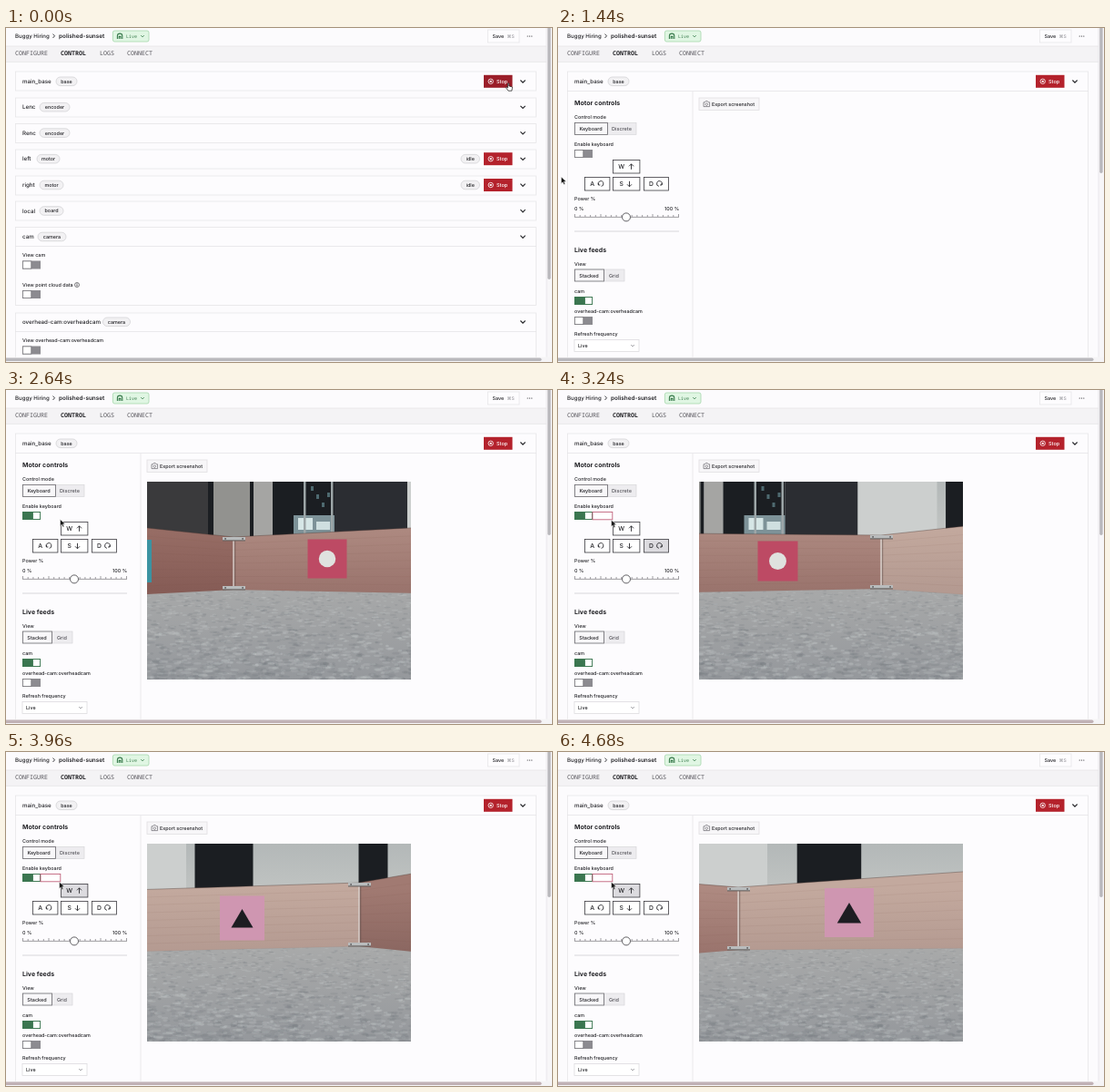
Write an HTML page with a canvas that moves like this. It is 600 by 368 pixels and loops after 4800 ms.

```html
<!DOCTYPE html>
<html lang="en">
<head>
<meta charset="utf-8">
<title>Robot control panel</title>
<style>
  html, body { margin: 0; width: 100%; height: 100%; overflow: hidden; background: #fcfbfd; }
  svg { position: absolute; left: 0; top: 0; font-family: Inter, "Liberation Sans", sans-serif; font-weight: 450; text-rendering: geometricPrecision; fill: #222226; }
  canvas { position: absolute; left: 155px; top: 101px; }
  .mono { font-family: "Noto Sans Mono", monospace; }
  .line { fill: none; stroke: #2a2a2e; stroke-width: .9; }
  .soft { stroke: #e6e5e8; stroke-width: .8; fill: none; }
</style>
</head>
<body>
<svg id="ui" width="600" height="368" viewBox="0 0 600 368"></svg>
<canvas id="feed" width="290" height="218"></canvas>
<script>
const LOOP = 4800, STEP = 120;
const EXPAND = 480, CAM_ON = 960, FEED_ON = 1680, KEYS_ON = 2280, FOCUS = 2880;
const $ = id => document.getElementById(id);

// ---------- interface pieces ----------
const text = (x, y, s, size = 5.5, attr = '') =>
  `<text x="${x}" y="${y + size * .36}" font-size="${size}" ${attr}>${s}</text>`;
const mid = 'text-anchor="middle"';
const rect = (x, y, w, h, fill, attr = '') =>
  `<rect x="${x}" y="${y}" width="${w}" height="${h}" fill="${fill}" ${attr}/>`;
const path = (d, attr = 'class="line"') => `<path d="${d}" ${attr}/>`;
const chevron = (x, y, r = 2.6, attr = 'class="line" style="stroke-width:1.2"') =>
  path(`M${x - r} ${y - r / 2}l${r} ${r}l${r} ${-r}`, attr);
const group = (id, body) => `<g id="${id}">${body}</g>`;
const soft = d => path(d, 'class="soft"');

const pill = (x, y, w, s) =>
  rect(x, y - 4.8, w, 9.6, '#f2f1f3', 'rx="4.8" stroke="#cfced2" stroke-width=".7"') +
  text(x + w / 2, y, s, 5.4, mid);

const stop = (y, id = '') =>
  rect(525, y - 7, 31.5, 14, '#b4222c', `id="${id}"`) +
  `<circle cx="532.7" cy="${y}" r="2.7" fill="none" stroke="#fff" stroke-width=".8"/>` +
  rect(531.7, y - 1, 2, 2, '#fff') +
  text(539, y, 'Stop', 5.6, 'fill="#fff" font-weight="500"');

const rowHead = (y, name, x, w, kind) =>
  text(18, y, name, 6.2) + pill(x, y, w, kind) + chevron(568, y);

const card = (y, h) => rect(10.5, y, 572, h, '#fdfcfe', 'class="soft" style="fill:#fdfcfe"');

const off = (x, y) =>
  rect(x, y, 20, 9, '#8c8b90') + rect(x + .4, y + .4, 9.4, 8.2, '#fff', 'stroke="#77767b" stroke-width=".8"');
const on = (x, y) =>
  rect(x, y, 20, 9, '#3b7650') + rect(x + 11.4, y + .5, 8.2, 8, '#fff', 'stroke="#3b7650" stroke-width=".9"');

const tabs = (x, y, w1, a, w2, b) =>
  rect(x + w1, y, w2, 13, '#edecef', 'stroke="#d8d7da" stroke-width=".7"') +
  rect(x + .4, y, w1, 13, '#f8f7f9', 'stroke="#67666b" stroke-width=".8"') +
  text(x + w1 / 2, y + 6.7, a, 5.5, mid + ' font-weight="500"') +
  text(x + w1 + w2 / 2, y + 6.7, b, 5.5, mid + ' fill="#55545a"');

const turn = (x, y, dir) =>
  path(`M${x - .6 * dir} ${y + 2.8}A2.9 2.9 0 1 ${dir > 0 ? 1 : 0} ${x + 2.6 * dir} ${y + 1.2}m${-2 * dir} .2h${2 * dir}v-2`);
const arrow = (x, y, dir) =>
  path(`M${x} ${y + 3 * dir}v${-6 * dir}m-2.5 ${2.5 * dir}l2.5 ${-2.5 * dir}l2.5 ${2.5 * dir}`);
const keyCap = (x, y, w, k, icon) =>
  rect(x + .4, y + .4, w, 14.6, '#fff', `id="key${k}" stroke="#3b3a3f" stroke-width=".8"`) +
  text(x + w / 2 - 5, y + 7.7, k, 6.8, mid + ' font-weight="500"') + icon;

const header =
  text(10, 8.8, 'Buggy Hiring', 6.1) +
  path('M51.5 6.6l2 2.2l-2 2.2') +
  text(58, 8.8, 'polished-sunset', 6.4, 'font-weight="600"') +
  rect(117.4, 3, 39.6, 12, '#e0f6e3', 'rx="2" stroke="#a5d7ab" stroke-width=".8"') +
  path('M122.4 12v-3.2a2.7 2.7 0 0 1 5.4 0v3.2M124.2 12v-2.6h1.8v2.6', 'fill="none" stroke="#3a7c4e" stroke-width="1.1"') +
  text(132, 9, 'Live', 5, 'class="mono" fill="#3a7c4e"') +
  chevron(150, 9, 1.7, 'fill="none" stroke="#3a7c4e" stroke-width=".9"') +
  rect(529.5, 2, 34.5, 14, '#fdfcfe', 'class="soft" style="fill:#fdfcfe"') +
  text(534.5, 9, 'Save', 5.4, 'font-weight="500"') +
  text(550.5, 9, '⌘S', 5, 'fill="#9a999e"') +
  [573.2, 575.5, 577.8].map(x => `<circle cx="${x}" cy="9" r=".6"/>`).join('') +
  rect(0, 20, 594, 17, '#f4f3f5') + soft('M0 20H594M0 37.4H594') +
  [[10, 'CONFIGURE'], [60, 'CONTROL'], [103, 'LOGS'], [133, 'CONNECT']].map(([x, s]) =>
    text(x, 28, s, 6.67, `class="mono" ${x === 60 ? 'font-weight="700"' : 'fill="#55545a"'}`)).join('');

const list =
  [48, 77, 105.5, 134, 163, 191].map(y => card(y, 21)).join('') +
  card(219.5, 86) + card(314, 70) + soft('M10 240.5H583M10 334.5H583') +
  rowHead(58.8, 'main_base', 55, 23, 'base') +
  rowHead(87.2, 'Lenc', 37, 33, 'encoder') +
  rowHead(115.6, 'Renc', 37, 33, 'encoder') +
  rowHead(144.2, 'left', 34, 25, 'motor') +
  rowHead(173, 'right', 37, 26, 'motor') +
  rowHead(201.5, 'local', 37, 26, 'board') +
  rowHead(230, 'cam', 35, 31, 'camera') +
  rowHead(323.8, 'overhead-cam:overheadcam', 106.5, 30, 'camera') +
  [144.2, 173].map(y => pill(500, y, 20.5, 'idle') + stop(y)).join('') +
  text(18, 250.5, 'View cam', 5.4) + off(18, 256.5) +
  text(18, 283, 'View point cloud data', 5.4) +
  '<circle cx="78" cy="283" r="2.5" class="line" style="stroke-width:.6"/>' + path('M78 282.4v2M78 281.2v.5') +
  off(18, 289) +
  text(18, 344.5, 'View overhead-cam:overheadcam', 5.4) + off(18, 350.5);

let ticks = '';
for (let i = 0; i <= 20; i++) ticks += `M${18.5 + i * 5.7} 208v${i % 5 ? -2 : -3}`;

const panel =
  card(48, 340) + soft('M10 69.5H583M148 70V363') +
  rowHead(58.8, 'main_base', 55, 23, 'base') +
  text(18, 82, 'Motor controls', 7, 'font-weight="700"') +
  text(18, 98.5, 'Control mode', 5.4) + tabs(18, 104.4, 36, 'Keyboard', 32, 'Discrete') +
  text(18, 128.3, 'Enable keyboard', 5.4) +
  group('keysOff', off(18, 134)) + group('keysOn', on(18, 134)) +
  group('focus', rect(38, 134.4, 21.8, 8.4, '#fff', 'stroke="#c0607a" stroke-width=".9"')) +
  keyCap(60, 145, 29.5, 'W', arrow(80.5, 152.8, 1)) +
  keyCap(29, 164, 27.5, 'A', turn(47, 171.6, -1)) +
  keyCap(60, 164, 29.5, 'S', arrow(78.5, 171.8, -1)) +
  keyCap(94, 164, 27, 'D', turn(111.5, 171.6, 1)) +
  text(18, 188.3, 'Power %', 5.4) + text(18, 199, '0 %', 5.4) + text(133, 199, '100 %', 5.4, 'text-anchor="end"') +
  path('M18 208.4H133' + ticks, 'stroke="#77767b" stroke-width=".7" fill="none"') +
  '<circle cx="75" cy="208.4" r="4.5" fill="#fff" stroke="#3b3a3f" stroke-width=".8"/>' +
  path('M18 224H133', 'stroke="#d3d2d6" stroke-width=".9"') +
  text(18, 244, 'Live feeds', 7, 'font-weight="700"') +
  text(18, 260.3, 'View', 5.4) + tabs(18, 266, 32, 'Stacked', 23, 'Grid') +
  text(18, 290.3, 'cam', 5.4) + group('camOff', off(18, 296)) + group('camOn', on(18, 296)) +
  text(18, 312, 'overhead-cam:overheadcam', 5.4) + off(18, 318) +
  text(18, 337.3, 'Refresh frequency', 5.4) +
  rect(18, 343.4, 71, 13, '#fff', 'stroke="#dcdbdf" stroke-width=".8"') +
  text(22, 350, 'Live', 5.4) + chevron(82, 350, 1.7, 'fill="none" stroke="#77767b" stroke-width=".8"') +
  rect(155, 77, 66, 13.4, '#f7f6f8', 'stroke="#e0dfe2" stroke-width=".8"') +
  path('M160 81.8h1.5l.8-1.2h2l.8 1.2h1.5v4.8h-6.6zM163.3 82.8a1.3 1.3 0 1 0 .01 0', 'fill="none" stroke="#66656a" stroke-width=".7"') +
  text(169, 83.8, 'Export screenshot', 5.4, 'font-weight="500"');

const bars =
  rect(594, 0, 6, 363, '#f7f6f8') + soft('M594 0V363') +
  rect(595.2, -4, 3.4, 281, '#b9b8bc', 'id="vbar" rx="1.7"') +
  rect(0, 362.6, 600, 5.4, '#f5f4f6') +
  rect(-4, 363.6, 592.5, 3.4, '#b9b8bc', 'id="hbar" rx="1.7"');

const cursor = group('cursor',
  group('arrow', path('M0 0v7.4l1.8-1.6l1.2 2.7l1.4-.6l-1.2-2.6h2.4z', 'fill="#111" stroke="#fff" stroke-width=".5"')) +
  group('hand', path('M-.6 0q.8-.9 1.4 0v3l3 .8q.8.3.6 1.4l-.6 3h-3.8l-2.6-3.4q0-1 1-.6l1 .8z', 'fill="#fff" stroke="#111" stroke-width=".7"')));

$('ui').innerHTML = rect(0, 0, 600, 368, '#fcfbfd') + header + group('list', list) + group('panel', panel) +
  stop(58.8, 'mainStop') + bars + cursor;

// ---------- timing ----------
function sample(keys, t) {
  let i = 0;
  while (i < keys.length - 2 && t > keys[i + 1][0]) i++;
  const [a, b] = [keys[i], keys[i + 1]];
  const k = Math.min(1, Math.max(0, (t - a[0]) / (b[0] - a[0])));
  return a[1].map((v, n) => v + (b[1][n] - v) * k);
}

const pointer = [
  [0, [552, 61]], [360, [567, 57]], [600, [567, 58]], [1200, [8, 166]], [1440, [3.5, 164]],
  [1800, [6, 160]], [2160, [28, 138]], [2400, [30, 138]], [2640, [59.5, 142.5]], [3000, [58.6, 143.2]]
];
const presses = [['D', 2880, 3480], ['W', 3840, 4080], ['A', 4200, 4440], ['W', 4560, 4800]];

// Pose: three wall corners (x, top, bottom), circle sign, triangle sign (x, y, size)
const view = {
  start: [250, 162, 220, 463, 151, 224, 710, 150, 225, 353, 186, 43, 590, 185, 46],
  right: [138, 158, 223, 355, 160, 219, 602, 133, 236, 241.5, 188.5, 44, 477, 187, 48],
  next: [-70, 153, 222, 146, 153, 222, 396, 143, 213, 32, 186, 44, 268.5, 182, 48],
  near: [-79, 153, 221, 137, 152, 220, 388, 144, 214, 23, 186, 44, 259.5, 183, 49],
  end: [-15, 132, 235, 198, 149, 218, 473, 130, 216, 55, 186, 48, 320, 177, 54]
};
const poses = [[3000, view.start], [3240, view.right], [3600, view.next], [3960, view.near],
  [4200, view.near], [4620, view.end]];

// ---------- camera feed ----------
const ctx = $('feed').getContext('2d');
ctx.translate(-155, -101);
const box = (x, y, w, h, c) => { ctx.fillStyle = c; ctx.fillRect(x, y, w, h); };
const poly = (pts, c) => {
  ctx.fillStyle = c;
  ctx.beginPath();
  pts.forEach(p => ctx.lineTo(...p));
  ctx.fill();
};
const shade = (y0, y1, a, b) => {
  const g = ctx.createLinearGradient(0, y0, 0, y1);
  g.addColorStop(0, a);
  g.addColorStop(1, b);
  return g;
};
function random(seed) {
  return () => (seed = seed * 16807 % 2147483647) / 2147483647;
}

function carpet(pan) {
  box(155, 185, 290, 134, shade(212, 319, '#a9aaaa', '#95989c'));
  const r = random(77);
  for (let i = 0; i < 1800; i++) {
    const v = r(), x = ((r() * 340 + pan * (.8 + v * .4)) % 340 + 340) % 340 + 130;
    ctx.fillStyle = i % 2 ? 'rgba(215,217,219,.17)' : 'rgba(108,113,120,.16)';
    ctx.beginPath();
    ctx.ellipse(x, 212 + v * 108, 1.5 + r() * 4 * (v + .3), .5 + 1.1 * v, 0, 0, 7);
    ctx.fill();
  }
}

// Doors and window behind the pen; c and tri are the sign positions they stand behind
function backdrop(c, tri, k) {
  box(155, 101, 290, 84, shade(101, 165, '#b3b8b8', '#c3c6c4'));
  const dark = '#1b1e22', strip = (from, to, color) => box(c + from, 101, to - from, 84, color);
  strip(-205, -131, '#3a3a3c');
  strip(-131, -125, dark);
  strip(-125, -85, '#92928f');
  strip(-85, -81, dark);
  strip(-81, -60, '#a5a5a3');
  strip(-60, 8, dark);
  strip(8, 88, '#2b2d32');
  strip(88, 175, '#cccfce');

  box(c - 37, 138, 45, 22, '#7d9298');
  box(c - 32, 141, 16, 13, '#d6e6e6');
  box(c - 12, 145, 15, 9, '#cfdfe0');
  for (const x of [-26, 4]) strip(x, x + 2.5, '#9da6a8');
  for (let i = 0; i < 4; i++) box(c - 18 + i * 6, 106 + i * 9 % 20, 3, 5, '#4e6a70');

  box(tri - 52 * k, 101, 64 * k, 84, dark);
  box(tri + 128 * k, 101, 32 * k, 84, dark);
}

function bracket(x, top, bottom) {
  box(x - 1, top, 2.2, bottom - top, 'rgba(225,222,218,.6)');
  box(x + 1.2, top, 1, bottom - top, 'rgba(70,55,52,.5)');
  for (const y of [top, bottom - 4]) {
    box(x - 12, y, 25, 4, '#b9bcbd');
    box(x - 12, y + 3.4, 25, 1, '#5c5654');
    for (const dx of [-9, 10]) box(x + dx - .6, y + 1.2, 1.4, 1.4, '#3d3b3c');
  }
}

function drawFeed(t) {
  const p = sample(poses, t), c = [0, 3, 6].map(i => p.slice(i, i + 3));
  const [cx, cy, cs, tx, ty, ts] = p.slice(9);
  carpet(cx);
  backdrop(cx, tx, ts / 49);
  const ends = [[c[0][0] - 190, c[0][1] - 20, c[0][2] + 10], ...c, [c[2][0] + 140, c[2][1] - 24, c[2][2] + 14]];
  const wood = [['#986e66', '#865c56'], ['#ae8a81', '#9a746d'], ['#c3a99e', '#b49a91'], ['#a17a72', '#8b6761']];
  wood.forEach((w, i) => {
    const [l, r] = [ends[i], ends[i + 1]];
    poly([[l[0], l[1]], [r[0], r[1]], [r[0], r[2]], [l[0], l[2]]], shade(150, 220, ...w));
    ctx.lineWidth = .8;
    for (let n = 0; n < 9; n++) {
      const f = n / 8;
      ctx.strokeStyle = n ? 'rgba(110,75,66,.1)' : 'rgba(75,55,52,.5)';
      ctx.beginPath();
      ctx.moveTo(l[0], l[1] + (l[2] - l[1]) * f);
      ctx.lineTo(r[0], r[1] + (r[2] - r[1]) * f);
      ctx.stroke();
    }
  });
  box(c[0][0] - 132, c[0][1] + 3, 42, 47, '#3b93a2');
  c.forEach(v => bracket(...v));

  box(cx - cs / 2, cy - cs / 2, cs, cs, '#bd4a64');
  ctx.fillStyle = '#dfe2df';
  ctx.beginPath();
  ctx.arc(cx, cy, cs * .215, 0, 7);
  ctx.fill();

  box(tx - ts / 2, ty - ts / 2, ts, ts, '#cf96b1');
  poly([[tx, ty - ts * .205], [tx + ts * .245, ty + ts * .215], [tx - ts * .245, ty + ts * .215]], '#1d1d22');
}

// ---------- playback ----------
const show = (id, yes) => $(id).style.display = yes ? '' : 'none';

function render(t) {
  const open = t >= EXPAND, live = t >= FEED_ON;
  show('list', !open);
  show('panel', open);
  show('camOff', t < CAM_ON);
  show('camOn', t >= CAM_ON);
  show('keysOff', t < KEYS_ON);
  show('keysOn', t >= KEYS_ON);
  show('focus', t >= FOCUS);
  show('feed', live);
  show('hand', t < 720);
  show('arrow', t >= 720);
  $('mainStop').setAttribute('fill', t < 240 ? '#9b1e29' : '#b4222c');
  $('vbar').setAttribute('height', open ? 164 : 281);
  $('hbar').setAttribute('fill', live ? '#c0b1b5' : '#b9b8bc');
  for (const k of 'WASD') {
    const down = presses.some(([key, a, z]) => key === k && t >= a && t < z);
    $('key' + k).setAttribute('fill', down ? '#dcdbdf' : '#fff');
  }
  $('cursor').setAttribute('transform', `translate(${sample(pointer, t)})`);
  if (live) drawFeed(t);
}

const start = performance.now();
let last = -1;
function tick() {
  const t = Math.floor((performance.now() - start) % LOOP / STEP) * STEP;
  if (t !== last) render(last = t);
  requestAnimationFrame(tick);
}
tick();
</script>
</body>
</html>
```
